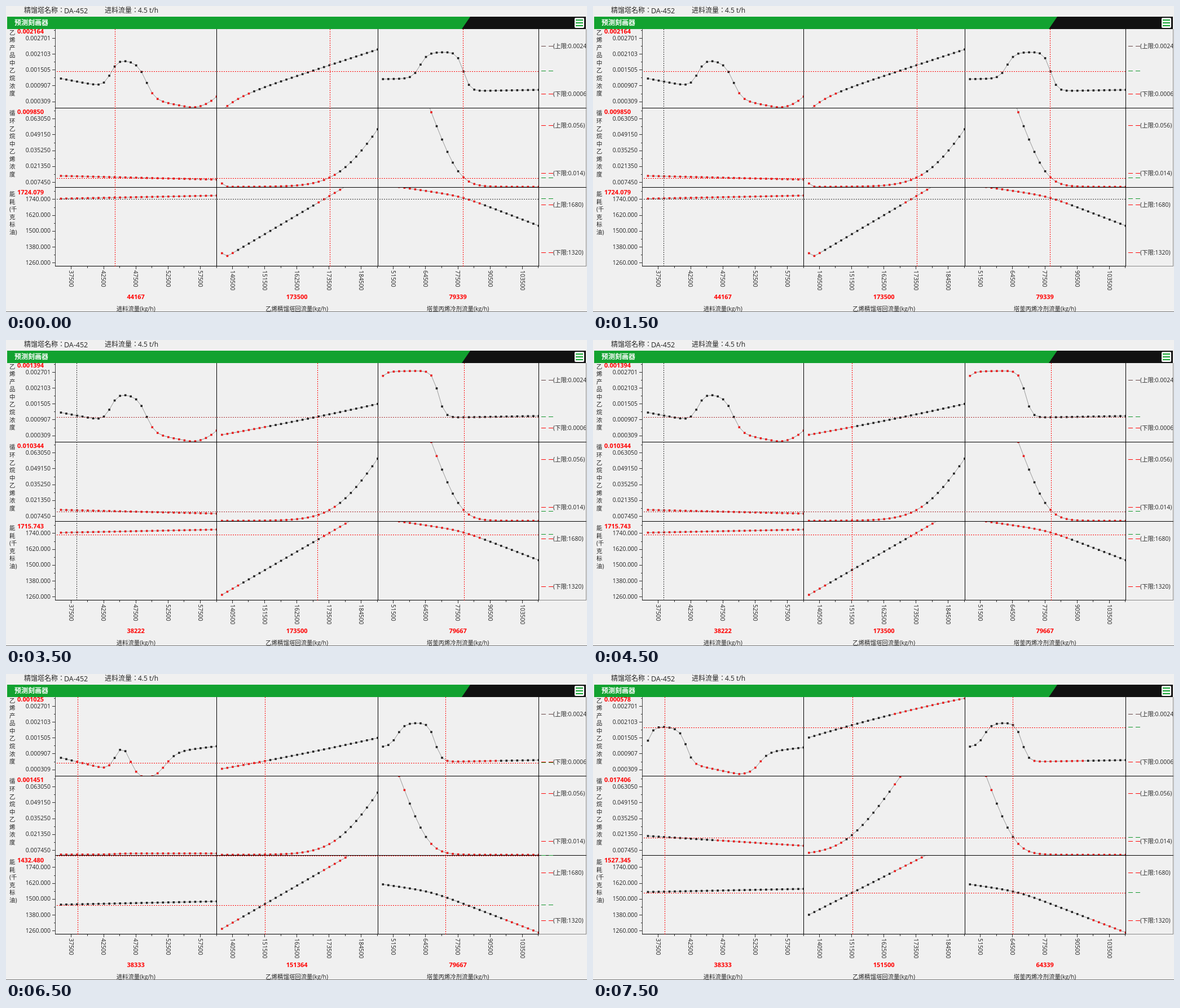
Animation of 1030x544 px, one loop 8000 ms. Source, as an HTML page with a canvas:

```html
<!DOCTYPE html>
<html lang="zh-TW">
<head>
<meta charset="utf-8">
<style>
html, body { margin: 0; width: 100%; height: 100%; overflow: hidden; background: #f0f0f0; }
canvas { display: block; }
</style>
</head>
<body>
<canvas id="stage" width="1030" height="544"></canvas>
<script>
const ctx = document.getElementById('stage').getContext('2d');
const FONT = '"Open Sans", "Noto Sans CJK TC", "Noto Sans CJK SC", "Noto Sans CJK", "Noto Sans", sans-serif';
const RED = '#f00', DARK = '#333', MAROON = '#a8282c', GREEN = '#12962c', BRAND = '#12a230', INK = '#222';
const LOOP = 8000, COUNT = 30, STEP = 9.52, TICK = 57.15;
const EDGES = [87, 373, 659, 944], TOPS = [41, 181, 322, 462];
const left = c => 87.9 + c * 285.45;

const { exp, log, max, min, round, floor } = Math;
const sigmoid = (i, c, w) => 1 / (1 + exp((c - i) / w));
const ramp = (i, c, w) => w * log(1 + exp((i - c) / w));

// Response curves: height on the stage for each sample index.
const hump = i => 129 + 1.8 * i - 54 * sigmoid(i, 9.3, 0.7) + 62 * sigmoid(i, 15.9, 0.8) - 0.93 * max(0, i - 23.5) ** 2;
const dip = i => 149 + 2.35 * min(i, 16) - 42.8 * exp(-(((i - 11.5) / 1.92) ** 2))
  - 46 * sigmoid(i, 19.4, 1.1) - 1.1 * max(0, i - 18);
const valley = i => 86.5 + 2 * min(i, 17) + 32 * exp(-i) + 58 * sigmoid(i, 7.2, 0.6)
  - 38 * sigmoid(i, 20.7, 0.9) - 1.1 * max(0, i - 20);
const bell = (rise, a, fall, b) => i => 130 - 0.17 * i - a * sigmoid(i, rise, 0.7) + b * sigmoid(i, fall, 0.6);
const bend = (y, slope, square = 0, start = 0, decay = 1) =>
  i => y + slope * i + square * i * i + start * exp(-i / decay);
const grow = (c, k = 15, start = 0) => i => 321.5 - k * ramp(i, c, 3) + start * exp(-3 * i);
const fall = c => i => 321.5 - 26 * ramp(c, i, 1.5);
const slide = (y, c) => i => y + 1.4 * i + 2.25 * ramp(i, c, 1.5);

const rows = [
  { title: [...'乙烯产品中乙烷浓度'], from: 0.002701, step: 0.000598, digits: 6, above: 71.3, below: 154.3, limits: ['0.0024', '0.0006'] },
  { title: [...'循环乙烷中乙烯浓度'], from: 0.06305, step: 0.0139, digits: 6, above: 209, below: 295.3, limits: ['0.056', '0.014'] },
  { title: ['能', '耗', '(千', '克', '标', '油)'], from: 1740, step: 120, digits: 3, above: 352, below: 436, limits: ['1680', '1320'] }
];

const axes = [
  { name: '进料流量(kg/h)', from: 37500, step: 5000 },
  { name: '乙烯精馏塔回流量(kg/h)', from: 140500, step: 11000 },
  { name: '塔釜丙烯冷剂流量(kg/h)', from: 51500, step: 13000 }
];

const steady = bend(302, 0.23), cost = bend(342.5, -0.19);
const riseB = bend(168.5, -1.66, -0.008), growB = grow(21.9), climbB = bend(453, -5.5);
const bellC = bell(2.65, 42, 9.7, 70), fallC = fall(8.35), slideC = slide(374, 9);

const states = [
  { at: 0, values: ['0.002164', '0.009850', '1724.079'], inputs: [44167, 173500, 79339],
    levels: [116, 306, 343], tones: [RED, RED, DARK],
    plots: [
      [hump, bend(168, -3.13, 0, 18, 3), bell(6.9, 46, 15, 70)],
      [steady, grow(22.5, 15, -6), fall(14.05)],
      [cost, bend(450.5, -5.63, 0, -11, 0.33), slide(317.5, 14.5)]] },
  { at: 2000, values: ['0.001394', '0.010344', '1715.743'], inputs: [38222, 173500, 79667],
    levels: [137, 305, 346], tones: [MAROON, MAROON, RED],
    plots: [
      [hump, riseB, bell(-1.5, 74, 10.3, 84)],
      [steady, growB, fall(14.35)],
      [cost, climbB, slide(318.2, 14.5)]] },
  { at: 5000, values: ['0.001025', '0.001451', '1432.480'], inputs: [38333, 151364, 79667],
    levels: [158, 323, 411], tones: [RED, RED, RED],
    plots: [
      [dip, riseB, bellC],
      [i => 321 - 2 * sigmoid(i, 10, 1), growB, fallC],
      [bend(410, -0.2), climbB, slideC]] },
  { at: 7500, values: ['0.000578', '0.017406', '1527.345'], inputs: [38333, 151500, 64339],
    levels: [95, 291, 389], tones: [RED, RED, RED],
    plots: [
      [valley, bend(113, -2.9, 0.017), bellC],
      [bend(288, 0.6), grow(7.2, 14), fallC],
      [bend(387.5, -0.19), bend(428, -4.85), slideC]] }
];

// Cursor drags: each moves one column's cursor until the next state.
const drags = [
  { at: 500, col: 0, x: 177 }, { at: 1000, col: 0, x: 129 }, { at: 1500, col: 0, x: 125 },
  { at: 3500, col: 1, x: 552 }, { at: 4000, col: 1, x: 471 }, { at: 4500, col: 1, x: 459 },
  { at: 6500, col: 2, x: 779 }, { at: 7000, col: 2, x: 744 }
];

function rect(x, y, w, h, color) {
  ctx.fillStyle = color;
  ctx.fillRect(x, y, w, h);
}

function text(s, x, cy, size, color = INK, align = 'left', weight = 400) {
  ctx.font = `${weight} ${size}px ${FONT}`;
  ctx.textAlign = align;
  ctx.fillStyle = color;
  ctx.fillText(s, x, cy + size * 0.36);
}

function dashes(x, y, length, color, upright) {
  for (let d = 0; d < length; d += 4) {
    if (upright) rect(x, y + d, 1, 2, color);
    else rect(x + d, y, 2, 1, color);
  }
}

function clipped(x, y, w, h, paint) {
  ctx.save();
  ctx.beginPath();
  ctx.rect(x, y, w, h);
  ctx.clip();
  paint();
  ctx.restore();
}

function header() {
  text('精馏塔名称：', 32, 8, 12);
  text('DA-452', 103, 8, 12.5);
  text('进料流量：', 175, 8, 12);
  text('4.5 t/h', 234, 8, 12);
  rect(2, 19, 1026, 22, '#111');
  ctx.fillStyle = BRAND;
  ctx.beginPath();
  ctx.moveTo(2, 19);
  ctx.lineTo(823, 19);
  ctx.lineTo(808, 41);
  ctx.lineTo(2, 41);
  ctx.fill();
  text('预测刻画器', 15, 30, 12, '#fff', 'left', 700);
  ctx.fillStyle = '#fff';
  ctx.beginPath();
  ctx.roundRect(1008, 21, 17, 18, 2);
  ctx.fill();
  for (let i = 0; i < 3; i++) rect(1010, 24 + i * 5, 13, 2, BRAND);
}

function frameLines() {
  EDGES.forEach((x, i) => rect(x, 41, 1, 422, i ? '#000' : '#444'));
  rect(1028, 41, 1, 422, '#888');
  rect(87, 181, 942, 1, '#000');
  rect(87, 322, 942, 1, '#000');
  rect(87, 462, 858, 1, '#000');
  rect(945, 462, 84, 1, '#888');
  rect(0, 543, 1030, 1, '#777');
}

function verticalAxis(row, r, value) {
  row.title.forEach((s, i) => text(s, 6, 47 + r * 143.7 + i * 13.55, 10.4));
  text(value, 20, 45 + r * 143.2, 11, RED, 'left', 700);
  for (let k = 0; k < 5; k++) {
    const y = 57 + r * 143.2 + k * 28.15;
    text((row.from - k * row.step).toFixed(row.digits), 79, y, 10.4, INK, 'right');
    rect(82, round(y), 5, 1, DARK);
    rect(85, round(y - 14), 2, 1, DARK);
  }
}

function horizontalAxis(axis, c, value) {
  for (let k = 0; k < 5; k++) {
    const x = left(c) + 28 + k * TICK;
    rect(floor(x), 463, 1, 5, DARK);
    rect(floor(x + TICK / 2), 463, 1, 3, DARK);
    ctx.save();
    ctx.translate(x, 470);
    ctx.rotate(Math.PI / 2);
    text(axis.from + k * axis.step, 0, 0, 10.4);
    ctx.restore();
  }
  const mid = left(c) + 142.3;
  text(value, mid, 517, 11, RED, 'center', 700);
  text(axis.name, mid, 538, 10.4, INK, 'center');
}

function legend(row, r, level) {
  const high = 71 + 141 * r, low = high + 85;
  const mark = (y, color) => [949, 962].forEach(x => rect(x, y, 8, 1, color));
  mark(high, r ? RED : '#684848');
  mark(low, RED);
  mark(level - 1, GREEN);
  clipped(945, 41, 83, 421, () => {
    text(`(上限:${row.limits[0]})`, 970, high + 0.5, 10.4);
    text(`(下限:${row.limits[1]})`, 970, low + 0.5, 10.4);
  });
}

function plot(f, r, c) {
  const { above, below } = rows[r], x = i => left(c) + STEP * (i + 1), top = TOPS[r] + 1;
  clipped(EDGES[c] + 1, top, EDGES[c + 1] - EDGES[c] - 1, TOPS[r + 1] - top, () => {
    ctx.strokeStyle = '#999';
    ctx.lineWidth = 1;
    ctx.beginPath();
    for (let i = 0; i < COUNT; i++) ctx.lineTo(x(i), f(i));
    ctx.stroke();
    for (let i = 0; i < COUNT; i++) {
      const y = f(i), out = y < above || y > below;
      rect(x(i) - 1.8, y - 1.8, 3.6, 3.6, out ? '#e81e1e' : INK);
    }
  });
}

function cursors(state, t) {
  axes.forEach((axis, c) => {
    const drag = drags.filter(d => d.col === c && d.at > state.at && d.at <= t).pop();
    const x = drag ? drag.x : round(left(c) + 29.1 + TICK * (state.inputs[c] - axis.from) / axis.step);
    const muted = c === 0 && t >= 1500 && t < 5000;
    dashes(x, 41, 422, muted ? DARK : RED, true);
  });
}

function draw(t) {
  const state = states.filter(s => s.at <= t).pop();
  rect(0, 0, 1030, 544, '#f0f0f0');
  header();
  frameLines();
  rows.forEach((row, r) => {
    verticalAxis(row, r, state.values[r]);
    legend(row, r, state.levels[r]);
    state.plots[r].forEach((f, c) => plot(f, r, c));
    dashes(90, state.levels[r], 854, state.tones[r], false);
  });
  axes.forEach((axis, c) => horizontalAxis(axis, c, state.inputs[c]));
  cursors(state, t);
}

const start = performance.now();
function tick() {
  draw((performance.now() - start) % LOOP);
  requestAnimationFrame(tick);
}
tick();
</script>
</body>
</html>
```
